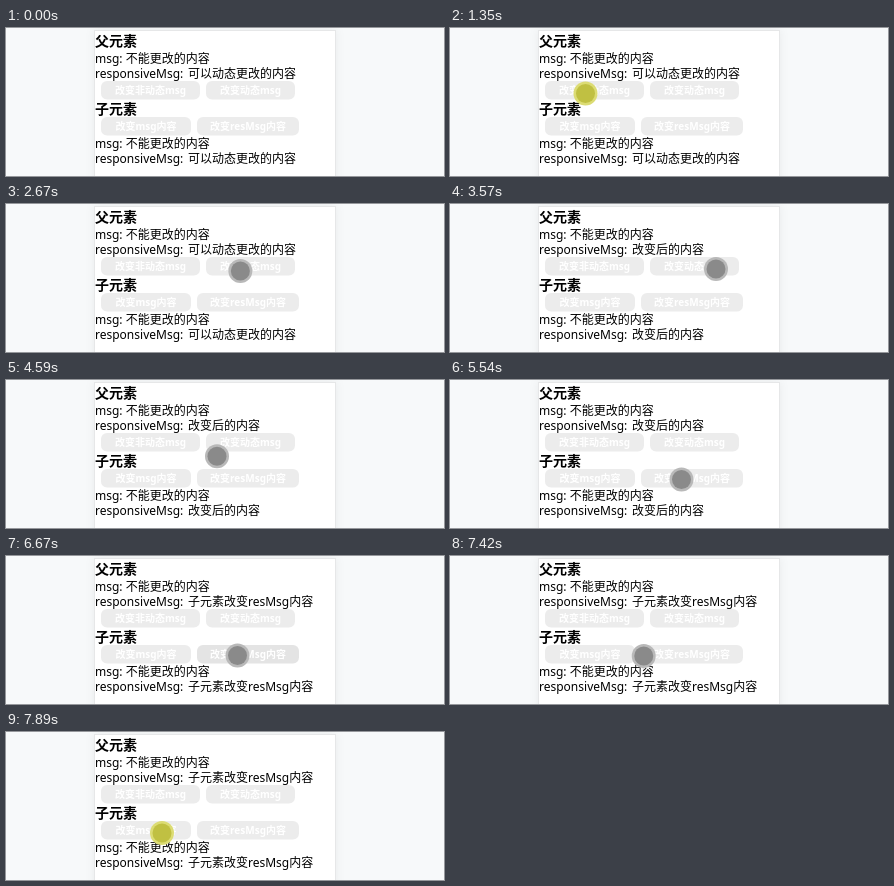
An HTML page for the animation above (8000 ms loop, 438x148 px).

```html
<!DOCTYPE html>
<html lang="zh-CN">
<head>
<meta charset="utf-8">
<title>父元素与子元素</title>
<style>
  html, body { margin: 0; width: 100%; height: 100%; overflow: hidden; background: #f7f9fa; }
  svg { display: block; width: 438px; height: 148px; }
  text { font: 12px "Noto Sans", "Noto Sans CJK SC", "Noto Sans CJK", sans-serif; fill: #000; white-space: pre; }
  .title { font-size: 14px; font-weight: 700; }
  .label { font-size: 10px; font-weight: 600; fill: #fff; text-anchor: middle; }
  .panel { fill: #fff; stroke: #e6e7e8; filter: drop-shadow(0 0 5px rgba(0, 0, 0, .06)); }
</style>
</head>
<body>
<svg id="stage" viewBox="0 0 438 148"></svg>
<script>
const LOOP = 8000;
const STEP = 68;
const LEFT = 89;
const stage = document.getElementById('stage');

function add(tag, attrs, content = '') {
  const el = document.createElementNS('http://www.w3.org/2000/svg', tag);
  for (const key in attrs) el.setAttribute(key, attrs[key]);
  el.textContent = content;
  return stage.appendChild(el);
}
const write = (x, y, content, cls = '') => add('text', { x, y, class: cls }, content);

// Buttons sit side by side, 6px apart
function addRow(y, ...items) {
  let x = LEFT + 6;
  return items.map(([label, width]) => {
    const box = add('rect', { x, y, width, height: 18.5, rx: 6 });
    write(x + width / 2, y + 13, label, 'label');
    x += width + 6;
    return box;
  });
}

// One title with two message lines; returns the changing value
function addBlock(title, titleY, msgY) {
  write(LEFT, titleY, title, 'title');
  write(LEFT, msgY, 'msg: 不能更改的内容');
  write(LEFT, msgY + 15, 'responsiveMsg:');
  return write(LEFT + 93, msgY + 15, '');
}

add('rect', { x: LEFT - 0.5, y: 2.5, width: 241, height: 160, class: 'panel' });
const buttons = [
  ...addRow(53, ['改变非动态msg', 99], ['改变动态msg', 89]),
  ...addRow(89, ['改变msg内容', 90], ['改变resMsg内容', 102])
];
const values = [addBlock('父元素', 18, 35), addBlock('子元素', 86, 120)];
const halo = add('circle', { r: 12 });
const dot = add('circle', { r: 9.5 });

// Where the pointer goes, and when
const entry = { x: 377, y: 155 };
const moves = [
  { start: 330, end: 740, x: 135.5, y: 65.5 },
  { start: 2470, end: 2820, x: 276, y: 68 },
  { start: 3100, end: 3240, x: 266, y: 65 },
  { start: 4250, end: 5000, x: 156, y: 97 },
  { start: 5070, end: 5540, x: 231.5, y: 99.5 },
  { start: 7140, end: 7750, x: 156, y: 101 }
];
const clicks = [
  { down: 1350, up: 1540, button: 0 },
  { down: 3370, up: 3570, button: 1, message: '改变后的内容' },
  { down: 6340, up: 6470, button: 3, message: '子元素改变resMsg内容' },
  { down: 7890, up: LOOP, button: 2 }
];

const mix = (a, b, p) => a + (b - a) * p;
const ease = p => (p + p * p * (3 - 2 * p)) / 2;

// The pointer advances once per STEP, sideways first, then vertically
function pointerAt(t) {
  const i = moves.findLastIndex(m => t >= m.start);
  if (i < 0) return null;
  const from = moves[i - 1] || entry;
  const to = moves[i];
  const count = Math.round((to.end - to.start) / STEP) + 1;
  const done = Math.floor((t - to.start) / STEP + 0.2) + 1;
  const p = ease(Math.min(1, done / count));
  return { cx: mix(from.x, to.x, p), cy: mix(from.y, to.y, p ** 1.5) };
}

function draw(t) {
  const last = clicks.findLast(c => c.message && t >= c.up);
  for (const value of values) value.textContent = last ? last.message : '可以动态更改的内容';

  // A clicked button darkens for one step, two steps after release
  buttons.forEach((box, i) => {
    const lit = clicks.some(c => c.button === i && Math.floor((t - c.up) / STEP) === 2);
    box.setAttribute('fill', lit ? '#e4e4e4' : '#ececec');
  });

  const pos = pointerAt(t);
  const pressed = clicks.some(c => t >= c.down && t < c.up);
  for (const circle of [halo, dot]) {
    circle.setAttribute('visibility', pos ? 'visible' : 'hidden');
    for (const key in pos) circle.setAttribute(key, pos[key]);
  }
  halo.setAttribute('fill', pressed ? '#dcdc74' : '#b9b9b9');
  dot.setAttribute('fill', pressed ? '#c0c042' : '#8a8a8a');
}

const begin = performance.now();
function tick() {
  draw((performance.now() - begin) % LOOP);
  requestAnimationFrame(tick);
}
tick();
</script>
</body>
</html>
```
